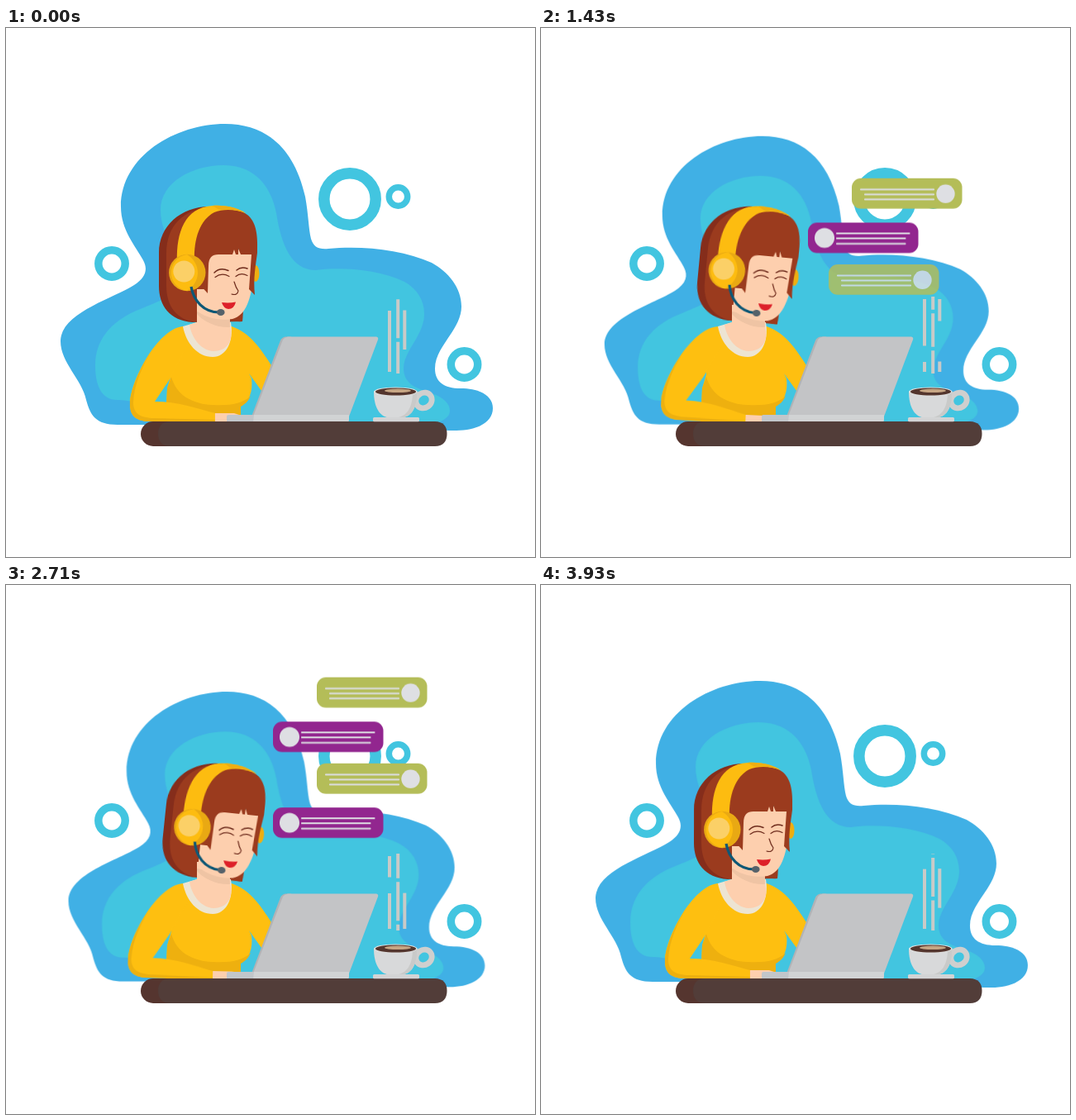
An HTML page for the animation above (4 s loop, 640 by 640 pixels).

```html
<!DOCTYPE html>
<html lang="en">
<head>
<meta charset="utf-8">
<title>Support chat</title>
<style>
html, body { margin: 0; height: 100%; overflow: hidden; background: #fff; }
svg { display: block; width: 100%; height: 100%; }

.blob { transform-origin: 326px 472px; animation: breathe 2s cubic-bezier(.37,0,.63,1) infinite alternate; }
.head { transform-origin: 250px 354px; animation: nod 2s cubic-bezier(.65,0,.35,1) infinite; }
.arm { transform-origin: 208px 353px; animation: type .5s -35ms cubic-bezier(.37,0,.63,1) infinite alternate; }
.steam { fill: none; stroke: #c9cac7; stroke-width: 4; }
.steam path { animation: drift 4s linear infinite; }
#chat { animation: rise 4s cubic-bezier(.333,.294,.667,.628) infinite; }

@keyframes breathe { to { transform: scale(.949); } }
@keyframes nod { 40%, 60% { transform: rotate(6deg); } }
@keyframes type { to { transform: rotate(2.7deg); } }
@keyframes drift {
  from { stroke-dashoffset: var(--o); }
  to { stroke-dashoffset: calc(var(--o) + 96.5px); }
}
@keyframes rise {
  from { transform: translateY(254px); }
  to { transform: translateY(35.7px); }
}
</style>
</head>
<body>
<svg id="stage" viewBox="0 0 640 640">
  <g class="blob">
    <path fill="#40b0e5" d="M265 116C312 116 348 142 362 204C366 226 366 243 369 255C372 265 378 268 390 267C430 263 480 268 515 284C535 295 551 314 551 337C551 365 519 385 519 412C519 428 530 436 550 436C572 436 589 444 589 460C589 478 568 487 545 487C500 487 400 478 300 480H135C108 480 102 468 97 450C92 425 66 405 66 379C66 345 128 328 155 311C169 302 172 292 166 281C157 264 139 245 139 216C139 155 205 116 265 116Z"/>
    <path fill="#42c5e0" d="M263 166C298 166 320 188 327 224C333 262 345 293 375 293C400 289 450 291 482 307C498 316 506 330 506 346C506 372 481 390 481 412C481 432 500 437 515 442C530 447 537 455 537 463C537 474 520 480 500 480H300C200 470 165 450 135 450C115 450 108 432 108 408C108 375 130 352 165 339C190 329 215 318 215 300C215 280 187 255 187 220C187 187 225 166 263 166Z"/>
  </g>

  <g fill="#fff" stroke="#42c5e0">
    <circle cx="416" cy="207" r="31.200" stroke-width="13.500"/>
    <circle cx="474.500" cy="204" r="11.200" stroke-width="7.500"/>
    <circle cx="128" cy="285" r="16.200" stroke-width="9.500"/>
    <circle cx="554.500" cy="407" r="16.200" stroke-width="9.500"/>
  </g>

  <g class="head">
    <path fill="#852d1b" d="M250 216C214 214 185 238 185 272V312C185 336 198 354 226 356L240 354V230Z"/>
    <path fill="#9b3b1e" d="M250 217C214 218 194 240 194 272V312C194 336 206 354 232 356L286 355L288 310L250 217Z"/>
    <ellipse cx="302" cy="297" rx="4.500" ry="10" fill="#eeae12"/>
  </g>

  <path fill="#febf10" d="M214 361C204 366 196 390 200 419L195 436L193 480H283L284 457C294 452 299 440 297 424L294 418L312 443L325 414C310 391 297 369 273 361Z"/>
  <path fill="#eeb00f" d="M200 422C206 444 225 455 250 456C270 457 286 455 296 445C293 452 288 456 284 458V480H193L195 436Z"/>

  <g class="arm">
    <path fill="#fdcfae" d="M246 466H276Q286 468 290 477L246 478Z"/>
    <path fill="#febf10" d="M214 361C183 364 150 428 150 455C150 470 158 475 172 476L253 477V466C230 460 208 452 180 452L200 422L222 380Z"/>
    <path fill="#edb00f" d="M178 387C160 415 150 440 150 455C150 470 158 475 172 476L253 477V474L180 472C162 472 154 466 154 453C155 432 164 410 178 387Z"/>
  </g>

  <path fill="#ede4d2" d="M214 361L231 356H272C276 380 266 398 250 398C232 398 218 382 214 361Z"/>
  <path fill="#fdcfae" d="M231 335H271V362C276 380 266 391 251 391C236 390 225 376 222 359L231 356Z"/>
  <path fill="#efc4a4" d="M231 343L271 350V362C256 363 240 356 231 346Z"/>

  <g class="head">
    <path fill="#9b3b1e" d="M288 320L286 355Q277 356 270 351Z"/>
    <path fill="#fdcfae" d="M243 268H300L300 296C297 328 290 348 274 352C258 355 238 349 231 342V316H243Z"/>
    <path fill="#9b3b1e" d="M225 230C236 214 276 214 292 226C302 234 305 248 304 272C302 288 299 302 301 323L294 316L297 274H284L281 267V274H278L276 268L274 274H257C249 274 245 278 245 288L244 321L232 308Z"/>
    <path fill="#fdbc10" d="M207 282C206 248 216 217 250 215C267 214 281 218 290 224C277 219 262 219 252 223C235 232 227 254 228 282Z"/>
    <path fill="#eeae12" d="M250 215C267 214 281 218 290 224C277 219 266 219 258 220Z"/>
    <circle cx="219.300" cy="296" r="22.200" fill="#e9a913"/>
    <path fill="#fdbc10" d="M219 274A22.200 22.200 0 0 0 219 318C227 313 232 305 232 296S227 279 219 274Z"/>
    <circle cx="215.300" cy="294.500" r="13" fill="#fbd067"/>
    <path fill="none" stroke="#0d5775" stroke-width="3.200" d="M224 313C227 330 239 344 258 344"/>
    <ellipse cx="259.800" cy="344" rx="4.800" ry="4" fill="#56626a"/>
    <g fill="none" stroke="#6d2a1b" stroke-width="1.200" stroke-linecap="round">
      <path d="M252 296Q259 289 269 293.500M279 293Q284 288.500 292 291" stroke-width="1.500"/>
      <path d="M253 301.500Q261 295.500 270 300.500M278 300.500Q284 295.500 292 299.500"/>
      <path d="M276 307Q278 314 281 318Q280 324 273 322"/>
    </g>
    <path fill="#dd2029" d="M261 332Q270 333 278 331.500Q276 340 269 340Q263 339 261 332Z"/>
  </g>

  <path fill="#b1b3b6" d="M338 373.500H345L308 470H297L332 378Q334 374 338 373.500Z"/>
  <path fill="#c3c4c6" d="M341 373.500H448Q451 374 450 377L415 470H299L335 377Q337 374 341 373.500Z"/>
  <path fill="#c2c6ca" d="M269 468H302V477H267V470Q267 468 269 468Z"/>
  <path fill="#d1d3d4" d="M300 468H415V474Q415 477 412 477H299Z"/>

  <rect x="163" y="476" width="80" height="30" rx="15" fill="#55352f"/>
  <path fill="#523d39" d="M199 476H519Q533.500 476.500 533.500 491T519 506H199Q184 505.500 184 491T199 476Z"/>

  <ellipse cx="505.500" cy="450.500" rx="10" ry="9" transform="rotate(-35 505.500 450.500)" fill="none" stroke="#cfcfce" stroke-width="6.800"/>
  <path fill="#d8d9da" d="M445 440C445 460 453 471.500 465 471.500H477C490 471.500 497.500 460 497.500 440Z"/>
  <path fill="#c9cac9" d="M492 440C492 458 486 470 472 471.500H477C490 471.500 497.500 460 497.500 440Z"/>
  <ellipse cx="471.300" cy="440" rx="26.300" ry="5.500" fill="#dfdfde"/>
  <ellipse cx="471.500" cy="440" rx="24.500" ry="4.500" fill="#54362e"/>
  <ellipse cx="474" cy="438.800" rx="16" ry="2.300" fill="#c6a583"/>
  <rect x="444" y="471" width="56" height="5.200" rx="1.500" fill="#d3d4d5"/>

  <g class="steam">
    <path d="M464 328V416" stroke-dasharray="77 19.5" style="--o:-14px"/>
    <path d="M474.200 325V418" stroke-dasharray="40.5 4.5 47 4.5" style="--o:-54.75px"/>
    <path d="M482.300 328V416" stroke-dasharray="47.5 49" style="--o:-13.5px"/>
  </g>

  <g id="chat"></g>
</svg>
<script>
const LOOP = 4000, SLIDE = 750, FADE = 300, SHIFT = 158;
const chat = document.getElementById('chat');

const kinds = {
  green: {
    x: 376, from: -SHIFT, fill: '#b4bd58', dot: [113.5, 18.8, 11.2],
    lines: 'M11 13.500H99M16 19.500H99M16 25.500H99'
  },
  purple: {
    x: 323, from: SHIFT, fill: '#92268f', dot: [20, 18.500, 12],
    lines: 'M35 13H122.500M35 19H117.500M35 25.500H117.500'
  }
};

function add(parent, tag, attrs) {
  const el = document.createElementNS('http://www.w3.org/2000/svg', tag);
  for (const key in attrs) el.setAttribute(key, attrs[key]);
  return parent.appendChild(el);
}

function addBubble(kind, y, start, leave) {
  const { x, from, fill, dot, lines } = kinds[kind];
  const place = add(chat, 'g', { transform: `translate(${x} ${y})` });
  const bubble = add(place, 'g', {});
  add(bubble, 'rect', { width: 133.5, height: 36.8, rx: 11, fill });
  add(bubble, 'circle', { cx: dot[0], cy: dot[1], r: dot[2], fill: '#dedfe3' });
  add(bubble, 'path', {
    d: lines, stroke: '#dedfe3', 'stroke-width': 2.2, 'stroke-linecap': 'round'
  });

  const away = { opacity: 0, transform: `translateX(${from}px)` };
  const home = { opacity: 1, transform: 'translateX(0px)' };
  const gone = { ...home, opacity: 0 };
  bubble.animate([
    { ...away, offset: 0 },
    { ...away, offset: start / LOOP, easing: 'cubic-bezier(.65,0,.35,1)' },
    { ...home, offset: (start + SLIDE) / LOOP },
    { ...home, offset: leave / LOOP, easing: 'cubic-bezier(.37,0,.63,1)' },
    { ...gone, offset: (leave + FADE) / LOOP },
    { ...gone, offset: 1 }
  ], { duration: LOOP, iterations: Infinity });
}

addBubble('green', 0, 62, 2976);
addBubble('purple', 53.7, 455, 3042);
addBubble('green', 104.2, 947, 3066);
addBubble('purple', 157.6, 1447, 3089);
</script>
</body>
</html>
```
